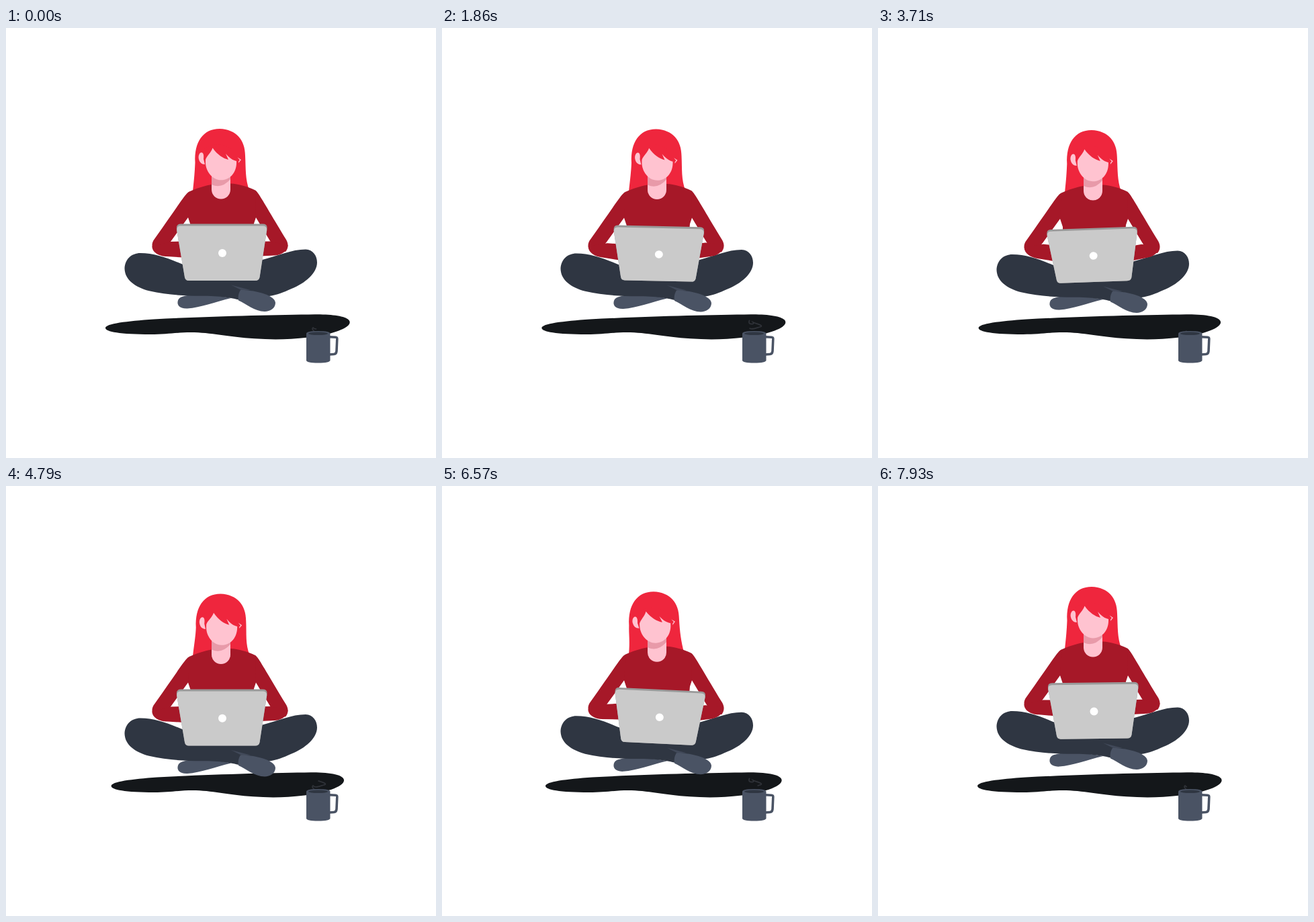
An HTML page for the animation above (8000 ms loop, 640 by 640 pixels).

```html
<!DOCTYPE html>
<html lang="en">
<head>
<meta charset="utf-8">
<style>
html, body { margin: 0; height: 100%; overflow: hidden; background: #fff; }
svg { display: block; width: 100vw; height: 100vh; }
.hair { fill: #ef263d; }
.skin { fill: #ffc3d0; }
.shirt { fill: #a61828; }
.legs { fill: #2f3642; }
.sock { fill: #4a5364; }
</style>
</head>
<body>
<svg viewBox="0 0 640 640">
  <path id="shadow" fill="#14171a" d="M148 446.500C148 440 180 436.300 220 433.500C300 429.300 400 427 460 426.300C490 426 511.700 430 511.700 438C511.700 448 480 457 450 460.500C420 464 395 464 370 462.300C330 459.800 305 453 275 453C255 453 240 456 215 456C170 456 148 452 148 446.500Z"/>
  <path id="steam" fill="none" stroke="#2f3238" stroke-width="1.8" pathLength="1" d="M462 453C456 451 455 447 457 446C460 450 466 447 473 445S470 441 463 438C466 442 457 441 457 438S457 436 458 435"/>

  <g class="sock">
    <path fill="none" stroke="#4a5364" stroke-width="3.600" d="M481 459.800L490.500 460.200Q493 460.300 492.800 463L492 481Q491.500 485.300 488 485.500L481 486"/>
    <path d="M447 455Q447 451 464.700 451Q482.500 451 482.500 455V494.500Q482 498.500 464.700 498.500Q447 498.500 447 494.500Z"/>
    <ellipse class="legs" cx="464.500" cy="454.800" rx="14.500" ry="2.300"/>
  </g>

  <g id="body">
    <path id="back" class="hair"/>

    <path class="sock" d="M262 400C275 396 300 395 335 402C310 408 290 416 270 417.500C258 418 255 412 255.500 408C256 403 259 401 262 400Z"/>
    <path class="legs" d="M176.500 358C177 344 187 335 200 335C222 335 242 343 266 353L378 346C405 339 425 329.500 446 329.500C457 330 463 339 463 349C463 365 445 380 425 388C412 394 404 397 392 399L348 405C335 401 320 399 290 398.700C265 398.500 240 397.500 213 391.300C192 385.500 177 375 176.500 358Z"/>
    <path fill="#414959" d="M335 382.500L364 390L352 391Z"/>
    <path class="sock" d="M349 390C375 390 401 399 401 409C401 417 393 422 385 422C370 422 357 410 346 405.500C345 398 347 393 349 390Z"/>

    <g class="shirt">
      <path d="M306 233C295 235 283 239 274 243L264 258L271 282L275 294V312H367L369 291L372 282L380 258L371 241.500C360 236 346 232 334 231.500Z"/>
      <path d="M274 243C268 245 264 253 221 314C216 320 217 327 220 331C228 331 238 327 245 318L271 282Z"/>
      <path d="M371 241.500C376 245 380 254 417 315C421 322 420 328 416 333C408 332 398 326 393 317L372 282Z"/>
      <path id="left" d="M245 318L272 317.500V342L240 340C228 340 217.500 334 217.500 325Z"/>
      <path id="right" d="M393 317.500L368 318V340L400 338.500C412 338 419.500 330 419.500 323Z"/>
    </g>

    <path class="skin" d="M306 218H334V240.500a14 14 0 0 1-28 0Z"/>
    <path fill="#e89aa9" d="M306 215V233Q321 240 334 225V215Z"/>
    <g id="head">
      <path class="hair" d="M290 183Q318 160 348 190L343 202L320 200L298 206Z"/>
      <path class="skin" d="M297 196C299 190 305 186 307.500 178.500C315 189 323 194 331 196L327 187C333 194 338 197 343 198C344 213 335 226.300 320 226.300C307 226.300 297 213 297 200Z"/>
      <path class="skin" d="M291 185.300C288 185.300 286 190 286.800 194.500C288 200 291 203 296 203L294 195C295 188 293 185.300 291 185.300Z"/>
      <path class="skin" d="M344.500 192.500L350 196L346 201L346.200 198.500L348 196.500Z"/>
    </g>

    <g id="laptop">
      <path fill="#999" d="M260 291.500H382Q389.500 291.500 388.500 299L377.500 371Q376.500 376 371 376H272Q267 376 266 371L254 300Q253 291.500 260 291.500Z"/>
      <path fill="#cacaca" d="M260 294.500H382Q388.500 294.500 388.200 301L377.500 371Q376.500 376 371 376H272Q267 376 266 371L254.300 302Q253.500 294.500 260 294.500Z"/>
      <circle cx="322" cy="335" r="6" fill="#fff"/>
    </g>
  </g>
</svg>
<script>
const CYCLE = 4000, PEAK = 955;
const times = [0, 790, 1210, 2570, 3710, 3930, CYCLE];
const pose = {
  head: [0, 1.3, 3.9, -3.3, -0.2, 0, 0],
  tilt: [0, 0, 0, 2.7, -2, -0.7, 0],
  squash: [1, 0.995, 0.975, 0.955, 0.95, 0.99, 1],
  left: [0, 0, 12, -2, 6, 1, 0],
  right: [0, 0, -6, -5, -9, -0.5, 0]
};
const smooth = x => (1 - Math.cos(Math.PI * x)) / 2;
const linear = x => x;

function at(t, ts, values, ease = smooth) {
  let i = 0;
  while (i < ts.length - 2 && t >= ts[i + 1]) i++;
  const x = Math.min(1, Math.max(0, (t - ts[i]) / (ts[i + 1] - ts[i])));
  return values[i] + (values[i + 1] - values[i]) * ease(x);
}

const el = id => document.getElementById(id);
const move = (id, transform) => el(id).setAttribute('transform', transform);

function draw(now) {
  const t = now % CYCLE, beat = t % 2000;
  const lift = smooth(beat < PEAK ? beat / PEAK : (2000 - beat) / (2000 - PEAK));
  const p = {};
  for (const key in pose) p[key] = at(t, times, pose[key]);

  move('body', `translate(0 ${11.3 * lift})`);
  move('shadow', `translate(329.8 0) scale(${1 - 0.051 * lift} 1) translate(-329.8 0)`);
  move('head', `rotate(${p.head} 320 248)`);
  move('left', `rotate(${p.left} 228 328)`);
  move('right', `rotate(${p.right} 408 327)`);
  move('laptop', `translate(321 376) rotate(${p.tilt}) scale(1 ${p.squash}) translate(-321 -376)`);

  // The crown follows the head while the tips stay on the shoulders.
  const x = n => n + 0.95 * p.head;
  el('back').setAttribute('d', `M278 243C280 225 ${x(281)} 213 ${x(281.5)} 200
    C${x(280)} 170 ${x(293)} 150 ${x(318)} 150C${x(343)} 151 ${x(356)} 167 ${x(356)} 190
    C${x(357)} 210 356 225 ${362 + p.head / 2} 241Z`);

  // Steam grows out of the mug, then its tail follows.
  const u = (t + 500) % CYCLE;
  const end = at(u, [0, 210, 430, 1290, 1710], [0, 0.08, 0.24, 0.74, 1], linear);
  const start = at(u, [1750, 3070, 3900], [0, 0.42, 1], linear);
  el('steam').style.strokeDasharray = `0 ${start} ${Math.max(0, end - start)} 2`;
  el('steam').style.visibility = end - start > 0.002 ? 'visible' : 'hidden';

  requestAnimationFrame(() => draw(performance.now() - began));
}
const began = performance.now();
draw(0);
</script>
</body>
</html>
```
